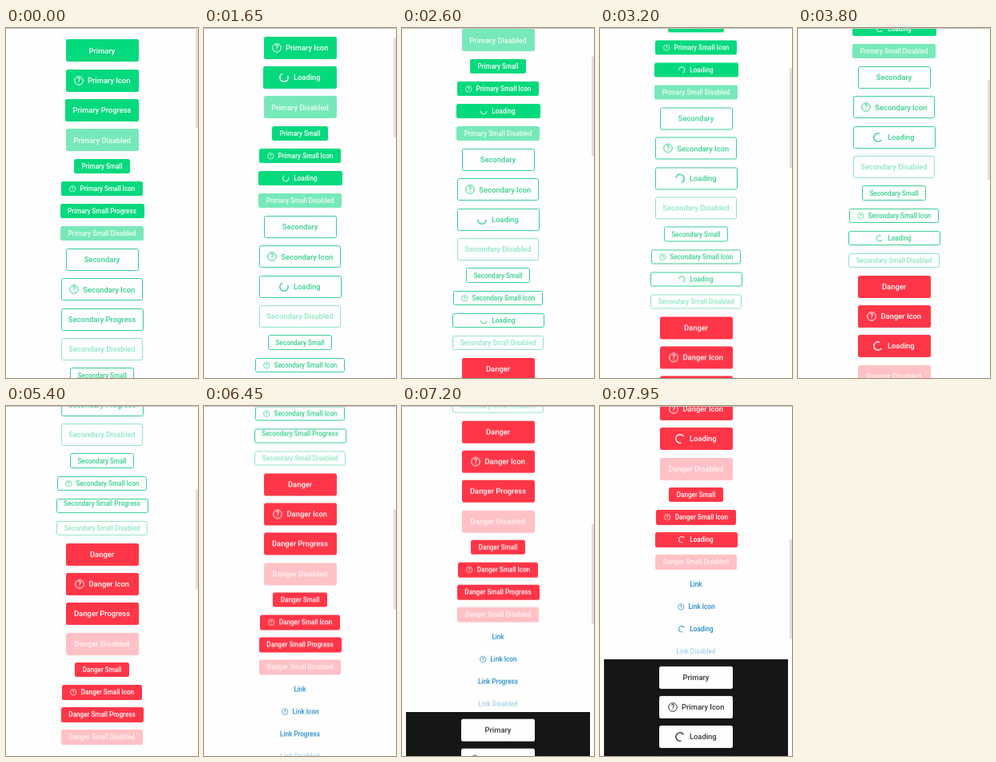
Animation of 240x438 px, one loop 8000 ms. Source, as an HTML page:

```html
<!DOCTYPE html>
<html lang="en">
<head>
<meta charset="utf-8">
<title>Button styles</title>
<style>
html, body { margin: 0; width: 100%; height: 100%; overflow: hidden; background: #fdfefd; }
#stage { position: relative; width: 240px; height: 438px; overflow: hidden; background: #fdfefd; }
#list { position: absolute; left: 0; top: 0; width: 240px; will-change: transform; }
#panel { position: absolute; left: 5px; top: 902px; width: 230px; height: 400px; background: #141715; }
#edge { position: absolute; left: 0; top: 0; width: 240px; height: 1px; background: #c6c2c4; }
#bar { position: absolute; left: 237px; top: 0; width: 3px; height: 125px; background: #e0e0e2; }
.btn {
  position: absolute; box-sizing: border-box; height: 28px; border-radius: 2.5px;
  font: 500 9.4px/1 Roboto, sans-serif; white-space: nowrap;
}
.small { height: 18.6px; font-size: 8.15px; }
.face {
  position: absolute; inset: 0; display: flex; gap: 5.5px;
  align-items: center; justify-content: center;
}
.outline { border: 1px solid; }
.busy, .loading .idle { display: none; }
.loading .busy { display: flex; }
svg { width: 12px; height: 12px; flex: none; overflow: visible; }
.small svg { width: 8.4px; height: 8.4px; }
circle { fill: none; stroke: currentColor; stroke-width: 1; }
.arc { stroke-width: 1.4; }
svg text { font: 500 8.6px Roboto, sans-serif; fill: currentColor; text-anchor: middle; }
</style>
</head>
<body>
<div id="stage">
  <div id="list"><div id="panel"></div></div>
  <div id="edge"></div>
  <div id="bar"></div>
</div>
<script>
const LOOP = 8000;
const SCROLL = [[0, 0], [1176, 0], [1650, 41], [2600, 125], [3800, 228],
                [5400, 366], [6450, 453.5], [7950, 585], [8000, 589.3]];
const BUSY = [[1200, 4225], [7250, LOOP]];
const KINDS = ['', ' Icon', ' Progress', ' Disabled'];
const ROWS = [0, 37.4, 74.7, 112.1, 144.7, 172.8, 200.8, 228.9];

const ICON = '<svg viewBox="0 0 12 12"><circle cx="6" cy="6" r="5.3"/><text x="6" y="9">?</text></svg>';
const SPINNER = '<svg viewBox="0 0 12 12"><circle class="arc" cx="6" cy="6" r="5.2" pathLength="360"/></svg>';

const GROUPS = [
  { name: 'Primary', y: 28.3, widths: [91, 91, 92, 91, 70, 102, 105, 104],
    bg: '#05d97d', off: '#77e9b9', ink: '#fff', offInk: '#eefcf6' },
  { name: 'Secondary', y: 290, widths: [91, 102, 103, 102, 80, 112, 115, 114],
    ink: '#35cf8e', offInk: '#8fe6c2' },
  { name: 'Danger', y: 551.5, widths: [91, 91, 91, 91, 68, 99.5, 103, 102],
    bg: '#ff3648', off: '#ffc1c5', ink: '#fff', offInk: '#fff3f4' },
  { name: 'Primary', y: 924.5, widths: [92, 92, 92, 92],
    bg: '#fdfefd', off: '#8a8b8a', ink: '#333', offInk: '#444' }
];

const stage = document.getElementById('stage');
const list = document.getElementById('list');
const bar = document.getElementById('bar');

function addButton({ label, kind, small, y, width, bg, ink, outline, lift = 0 }) {
  const el = document.createElement('div');
  const height = small ? 18.6 : 28;
  el.className = 'btn' + (small ? ' small' : '') + (outline ? ' outline' : '');
  el.style.cssText = `left:${120 - width / 2}px;top:${y - height / 2}px;width:${width}px;` +
    `color:${ink};background:${bg || 'transparent'}`;
  const icon = kind === 1 ? ICON : '';
  const idle = kind === 2 ? ' idle' : '';
  el.innerHTML = `<div class="face${idle}" style="top:${lift * 2}px">${icon}<span>${label}</span></div>`;
  if (kind === 2) el.innerHTML += `<div class="face busy">${SPINNER}<span>Loading</span></div>`;
  list.append(el);
}

for (const g of GROUPS) {
  g.widths.forEach((width, i) => {
    const kind = i % 4, small = i > 3, disabled = kind === 3;
    addButton({
      label: g.name + (small ? ' Small' : '') + KINDS[kind],
      kind, small, width, y: g.y + ROWS[i],
      bg: disabled ? g.off : g.bg,
      ink: disabled ? g.offInk : g.ink,
      outline: !g.bg,
      lift: g.name === 'Secondary' && i === 6 ? -2.5 : 0
    });
  });
}
KINDS.forEach((suffix, kind) => addButton({
  label: 'Link' + suffix, kind, small: true, width: 100,
  y: 808.2 + 28.1 * kind, ink: kind === 3 ? '#a8d0ea' : '#2089c8'
}));

const arcs = document.querySelectorAll('.arc');

function scrollAt(t) {
  const i = SCROLL.findIndex(([time]) => time > t);
  const [t0, y0] = SCROLL[i - 1], [t1, y1] = SCROLL[i];
  return y0 + (y1 - y0) * (t - t0) / (t1 - t0);
}

function spin(age) {
  const sweep = 360 * (0.63 + 0.12 * Math.cos((age - 450) / 1900 * 2 * Math.PI));
  const start = 110 + 0.36 * (age - 450) - sweep / 2;
  for (const arc of arcs) {
    arc.setAttribute('stroke-dasharray', `${sweep} ${360 - sweep}`);
    arc.setAttribute('transform', `rotate(${start} 6 6)`);
  }
}

function draw() {
  const t = performance.now() % LOOP;
  const y = scrollAt(t);
  list.style.transform = `translateY(${-y}px)`;
  bar.style.transform = `translateY(${y * 0.285}px)`;
  const span = BUSY.find(([from, to]) => t >= from && t < to);
  stage.classList.toggle('loading', !!span);
  if (span) spin(t - span[0]);
  requestAnimationFrame(draw);
}
draw();
</script>
</body>
</html>
```
